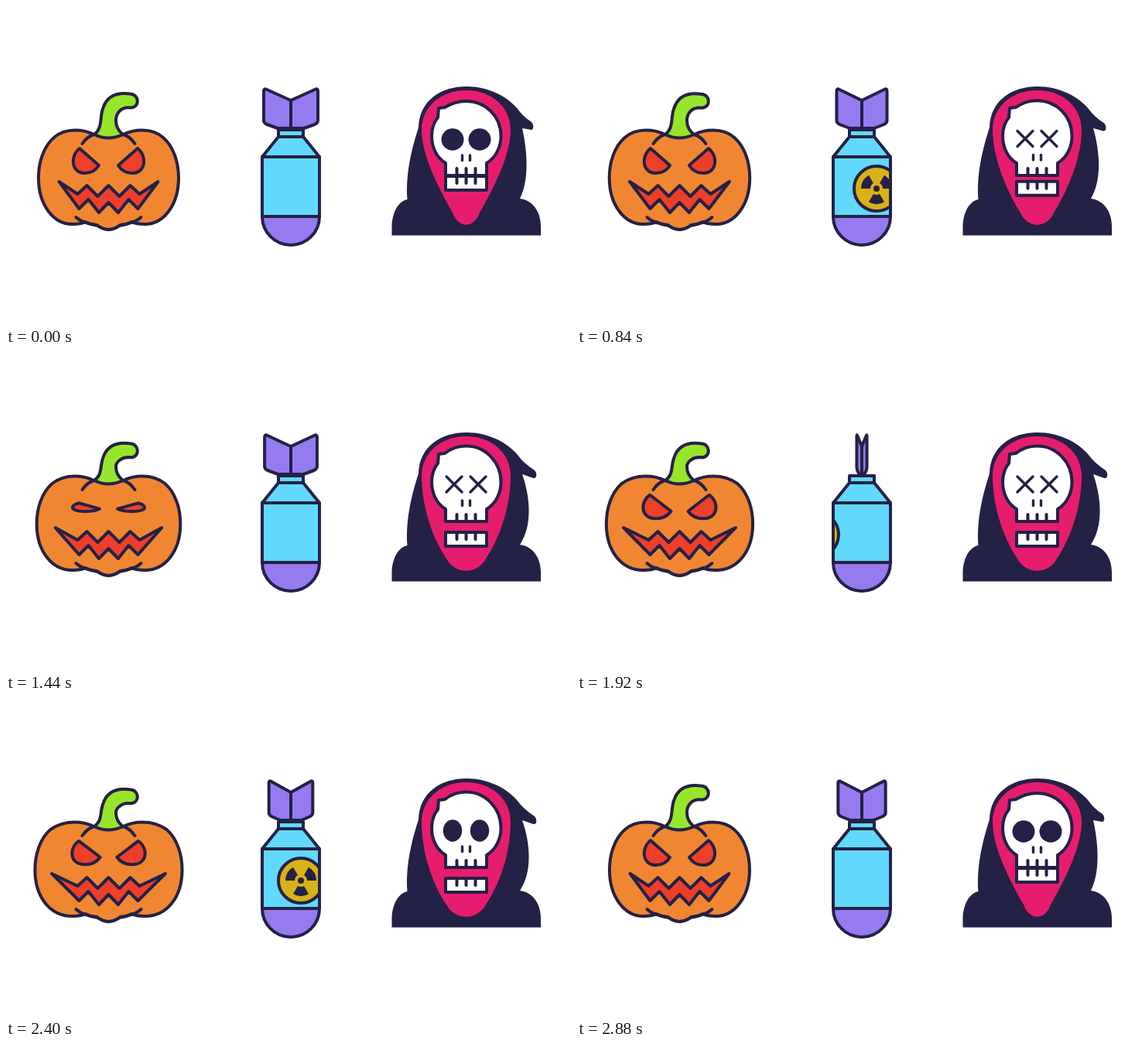
Recreate the animation shown at these times as an HTML page with a canvas. Size 730 by 411 pixels, loop 2.92 s.

```html
<!DOCTYPE html>
<html lang="en">
<head>
<meta charset="utf-8">
<title>Spooky icons</title>
<style>
html, body { margin: 0; width: 100%; height: 100%; overflow: hidden; background: #fff; }
canvas { display: block; }
</style>
</head>
<body>
<canvas id="stage" width="730" height="411"></canvas>
<script>
const LOOP = 2920, STEP = 40;
const INK = '#242146', ORANGE = '#f08632', RED = '#ee3f2a', GREEN = '#97e62b';
const BLUE = '#62d9fc', PURPLE = '#967af0', GOLD = '#d9b218', PINK = '#e61d6f';
const ctx = document.getElementById('stage').getContext('2d');

function ease(t, from, to) {
  const u = Math.min(1, Math.max(0, (t - from) / (to - from)));
  return u * u * (3 - 2 * u);
}

// Rises over a..b, falls back over c..d
const swell = (t, a, b, c, d) => ease(t, a, b) - ease(t, c, d);

function shape(d, fill, outline = true) {
  const path = new Path2D(d);
  if (fill) {
    ctx.fillStyle = fill;
    ctx.fill(path);
  }
  if (outline) ctx.stroke(path);
}

const polygon = points => 'M' + points.map(p => p.join(' ')).join('L') + 'Z';

function at(x, y, draw, sx = 1) {
  ctx.save();
  ctx.translate(x, y);
  ctx.scale(sx, 1);
  draw();
  ctx.restore();
}

function mirrored(x, draw) {
  at(x, 0, draw);
  at(x, 0, draw, -1);
}

function pumpkin(t) {
  const wide = swell(t, 620, 2250, 2370, 2820);
  const bend = 4.8 * swell(t, 760, 1440, 2370, 2820);
  const lid = 1 - 0.64 * swell(t, 1100, 1420, 1480, 1860) - 0.05 * wide;
  const w = 90.5 + 4.6 * wide;

  mirrored(132.5, () => shape(`M1 170L-19 166C-31 160 -55 156 ${20 - w} 170
    C${6 - w} 182 ${-w} 203 ${-w} 222C${-w} 258 ${20 - w} 282 -47 282
    C-40 282 -34 281 -30 279Q-22 283 -14 284Q-7 289 1 289`, ORANGE));

  mirrored(132.5, () => {
    shape('M-34 178Q-28 169 -19 166M-42 273Q-34 281 -15 283');
    ctx.save();
    ctx.translate(-29.5, 201);
    const k = 1 + 0.1 * wide;
    const eye = new Path2D();
    eye.addPath(new Path2D('M-8 -17L17 5C12 13 6 15 -1 15C-12 15 -17 7 -16 -3C-15 -9 -12 -14 -8 -17Z'),
      new DOMMatrix([k, 0, 0, lid, 0, 0]));
    ctx.fillStyle = RED;
    ctx.fill(eye);
    ctx.stroke(eye);
    ctx.restore();
  });

  // Only the corners of the mouth spread; the teeth stay put
  const half = [[0, 232], [-14, 246], [-28, 232], [-40, 243], [-64 - 9.5 * wide, 227],
    [-38, 262], [-26, 250], [-12.5, 267], [0, 254]];
  const rest = half.slice(1, -1).reverse().map(([x, y]) => [-x, y]);
  at(132.5, 0, () => shape(polygon([...half, ...rest]), RED));

  const y = v => v + bend;
  shape(`M114 166C125 158 121 ${y(144)} 125 ${y(133)}C130 ${y(116)} 144 ${y(111.5)} 160 ${y(113.5)}
    C173 ${y(114)} 173 ${y(131.5)} 161 ${y(131.5)}C148 ${y(130)} 142 ${y(139)} 142 148
    C142 157 146 162 151 166Q132 175 114 166Z`, GREEN);
}

function emblem() {
  shape('M29 0A29 29 0 1 1 -29 0A29 29 0 1 1 29 0Z', GOLD);
  ctx.fillStyle = INK;
  ctx.beginPath();
  ctx.arc(0, 0, 4, 0, 7);
  ctx.fill();
  for (let i = 0; i < 3; i++) {
    const mid = Math.PI * (0.5 + i * 2 / 3), spread = Math.PI / 6;
    ctx.beginPath();
    ctx.arc(0, 0, 20, mid - spread, mid + spread);
    ctx.arc(0, 0, 8, mid + spread, mid - spread, true);
    ctx.fill();
  }
}

function bomb(t) {
  const turn = Math.abs(Math.cos(Math.PI * t / 750));
  const x = v => v * turn;
  at(368, 0, () => {
    shape(`M${x(-35)} 110Q${x(-35)} 106 ${x(-31)} 108L0 122L${x(31)} 108Q${x(35)} 106 ${x(35)} 110
      V148Q${x(35)} 151 ${x(31)} 153L${x(17)} 158H${x(-17)}L${x(-31)} 153Q${x(-35)} 151 ${x(-35)} 148Z
      M0 122V158`, PURPLE);
    shape('M-16 160H16V169H-16Z', BLUE);
    shape('M-16 169H16L37 195H-37Z', BLUE);
    shape('M-37 195H37V272H-37Z', BLUE, false);
  });
  ctx.save();
  ctx.beginPath();
  ctx.rect(331, 195, 74, 77);
  ctx.clip();
  at(261 + 0.15 * (t % 1600), 236, emblem);
  ctx.restore();
  at(368, 0, () => {
    shape('M-37 195H37V272H-37Z');
    shape('M-37 272H37A37 37 0 0 1 -37 272Z', PURPLE);
  });
}

function reaper(t) {
  const open = swell(t, 220, 1420, 2400, 2830);
  const socket = 1 - swell(t, 500, 740, 2280, 2440);
  const tip = 4 * open, low = 8 * open;
  const y = v => v + 3 * open;

  shape(`M498.5 296.5V285C499 265 508 252 518.5 250C516 215 525 182 533 157
    C534 122 562 104 595 104C623 104 648 117 661 133
    Q668 143 ${679 + tip} ${y(150)}Q${682 + tip} ${y(153)} ${681 + tip} ${y(158)}
    Q${680 + tip} ${y(161)} ${676 + tip} ${y(159.5)}
    L667 158C${674 + tip} 190 ${676 + tip} 225 664 249
    C680 251 691 265 691 285V296.5Z`, INK, false);
  shape(`M594.5 109C560 109 537 132 537 160C537 192 ${558 - low * 1.4} 234 ${577 - low} 267
    C${584 - low / 2} 288 ${605 + low / 2} 288 ${612 + low} 267
    C${631 + low * 1.4} 234 652 192 652 160C652 132 629 109 594.5 109Z`, PINK, false);

  at(0, 13 * open, () => shape('M568 220H621V238H568Z', '#fff'));
  const top = 123 - 1.6 * open;
  shape(`M568 219V203C556 196 550 182 550 168C550 158 553 150 558 144L559 132L567 131
    C575 ${top + 3} 584 ${top} 594.5 ${top}
    C620 ${top} 639.5 143 639.5 168C639.5 182 633 196 621 203V219Z`, '#fff');
  shape('M582.5 210V219M594.5 210V219M606.5 210V219');
  at(0, 13 * open, () => shape('M582.5 220V229M594.5 220V229M606.5 220V229'));

  at(0, -open, () => {
    ctx.lineWidth = 3.4;
    shape('M589.5 193V199.5M599.5 193V199.5');
    for (const side of [-1, 1]) {
      const r = 10 * (1 - socket);
      if (r > 0) {
        at(594.5 + side * 15.5, 172, () => shape(`M${-r} ${-r}L${r} ${r}M${r} ${-r}L${-r} ${r}`));
      }
      if (socket > 0) {
        ctx.fillStyle = INK;
        ctx.beginPath();
        ctx.ellipse(594.5 + side * 17.5, 172.5, 14.5 * socket, 14.2, 0, 0, 7);
        ctx.fill();
      }
    }
  });
}

function frame() {
  const t = Math.floor(performance.now() % LOOP / STEP) * STEP;
  ctx.fillStyle = '#fff';
  ctx.fillRect(0, 0, 730, 411);
  ctx.strokeStyle = INK;
  ctx.lineJoin = ctx.lineCap = 'round';
  for (const draw of [pumpkin, bomb, reaper]) {
    ctx.lineWidth = 4;
    draw(t);
  }
  requestAnimationFrame(frame);
}
frame();
</script>
</body>
</html>
```
